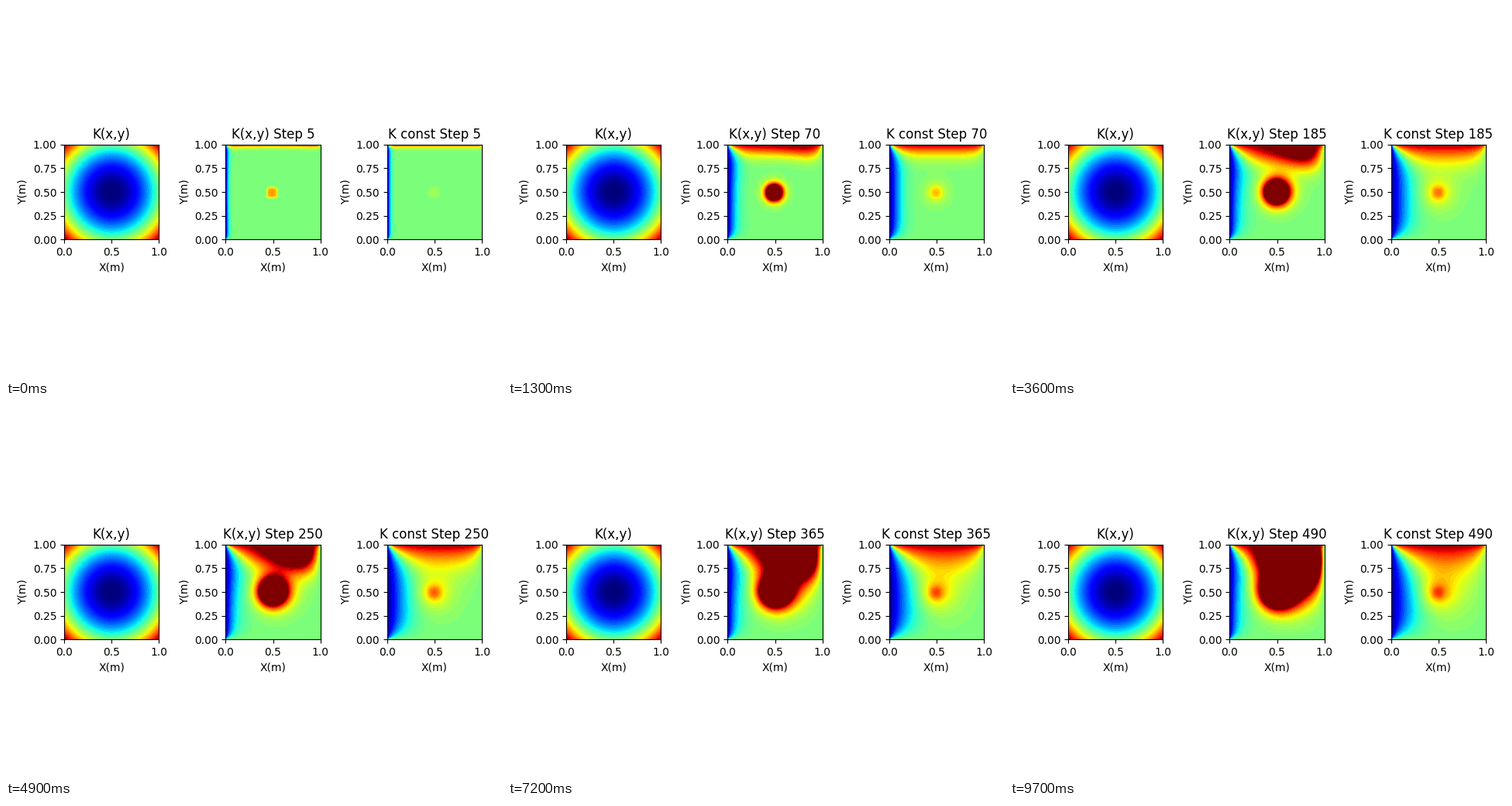
A matplotlib script for the animation above (9800 ms loop, 640 by 480 pixels).

```python
import numpy as np
import matplotlib.pyplot as plt
from matplotlib.animation import FuncAnimation

N = 50                # grid nodes per side
FRAMES, STRIDE = 98, 5
SUBSTEPS = 2
BANDS = 51

axis = np.linspace(0, 1, N)
h = axis[1]
X, Y = np.meshgrid(axis, axis)
HEATER = (slice(22, 27), slice(22, 27))

# Conductivities and rates per step, in units of one grid cell
k_radial = 0.1 + 0.4 * ((X - 0.5) ** 2 + (Y - 0.5) ** 2)
k_const = np.full((N, N), 0.23)
growth = 0.0163 * (X + Y - 1)


def diffuse(k, heat, rate):
    """Return the field after every STRIDE steps."""
    kx = (k[1:-1, 1:] + k[1:-1, :-1]) / 2
    ky = (k[1:, 1:-1] + k[:-1, 1:-1]) / 2
    t = np.zeros((N, N))
    t[1:-1, 0] = -1
    t[-1, 1:-1] = 1
    fields = []
    for _ in range(FRAMES):
        for _ in range(STRIDE * SUBSTEPS):
            flux_x = kx * np.diff(t[1:-1], axis=1)
            flux_y = ky * np.diff(t[:, 1:-1], axis=0)
            change = rate * t
            change[HEATER] += heat
            inner = np.diff(flux_x, axis=1) + np.diff(flux_y, axis=0)
            t[1:-1, 1:-1] += (inner + change[1:-1, 1:-1]) / SUBSTEPS
        fields.append(np.clip(t, -3, 3))
    return fields


radial_fields = diffuse(k_radial, 0.10, growth)
const_fields = diffuse(k_const, 0.019, np.zeros((N, N)))

fig, axes = plt.subplots(1, 3, figsize=(6.4, 4.8), dpi=100)
cmap = plt.get_cmap("jet", BANDS)


def panel(ax, data, title, low, high):
    image = ax.imshow(data, cmap=cmap, vmin=low, vmax=high, origin="lower",
                      extent=(-h / 2, 1 + h / 2, -h / 2, 1 + h / 2),
                      interpolation="bilinear", interpolation_stage="data")
    ax.set(xlim=(0, 1), ylim=(0, 1), xticks=[0, 0.5, 1],
           yticks=np.linspace(0, 1, 5), xlabel="X(m)", ylabel="Y(m)")
    ax.set_title(title)
    return image


panel(axes[0], k_radial, "K(x,y)", k_radial.min(), k_radial.max())
radial_image = panel(axes[1], radial_fields[0], "K(x,y) Step 5", -1, 1)
const_image = panel(axes[2], const_fields[0], "K const Step 5", -1, 1)
fig.tight_layout()


def update(frame):
    step = STRIDE * (frame + 1)
    radial_image.set_data(radial_fields[frame])
    const_image.set_data(const_fields[frame])
    axes[1].set_title(f"K(x,y) Step {step}")
    axes[2].set_title(f"K const Step {step}")
    return radial_image, const_image


anim = FuncAnimation(fig, update, frames=FRAMES, interval=100,
                     repeat=True, repeat_delay=0, blit=False)
plt.show()
```
